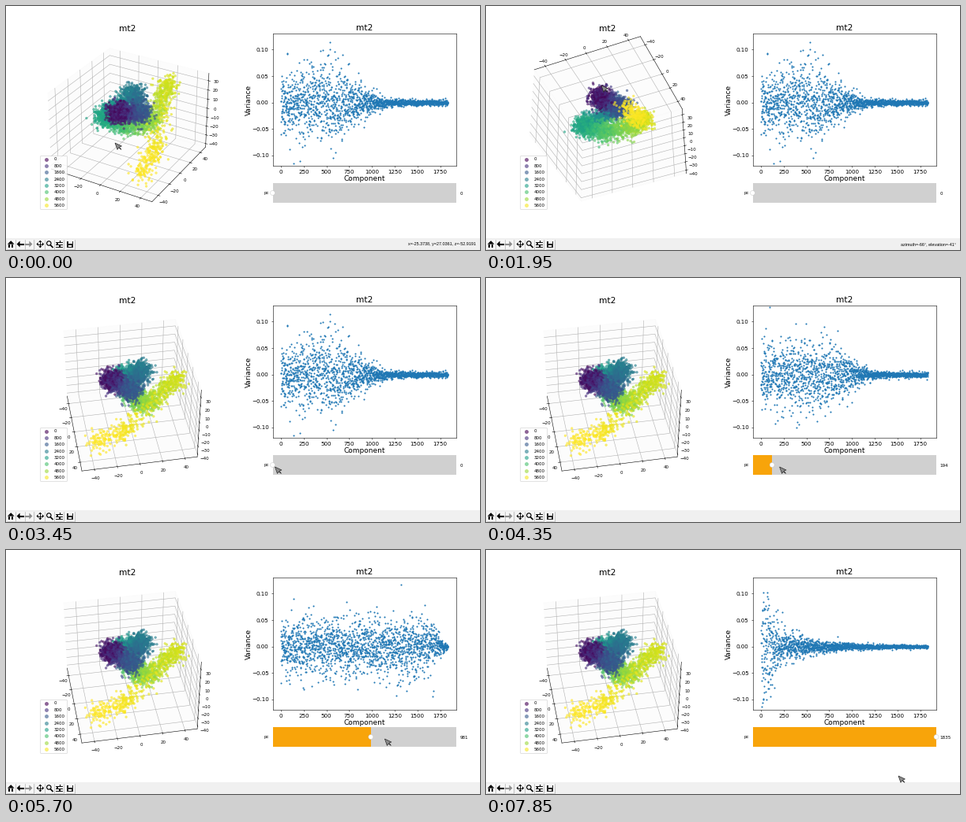
These frames come from a looping animation (600x310 px, 7.9 s). A matplotlib script:

```python
import matplotlib.pyplot as plt
import numpy as np
from matplotlib.animation import FuncAnimation
from matplotlib.patches import Circle, Polygon, Rectangle

W, H = 600, 310
FRAMES, STEP = 158, 50
N_COMP, N_POINTS, LAST = 1835, 4000, 5800
TRACK_X, TRACK_Y, TRACK_W, TRACK_H = 337.5, 224.8, 232.5, 25.4
KNOB_Y = TRACK_Y + TRACK_H / 2

fig = plt.figure(figsize=(12, 6.2), dpi=50, facecolor="white")


def add_axes(x, y, w, h, **kw):
    """Axes placed in pixels from the top left corner."""
    return fig.add_axes([x / W, 1 - (y + h) / H, w / W, h / H], **kw)


def ramp(t, start, end):
    return np.clip((t - start) / (end - start), 0, 1)


def smooth(u):
    return u * u * (3 - 2 * u)


# Visited states: time index and centre of each cluster
STATES = np.array([
    (0, -2, -17, 14), (700, -2, -16, 14), (1550, 12, -1, 10),
    (2350, -3, 11, 22), (3350, -25, -4, -4), (4150, -6, 3, -11),
    (4750, 15, 11, -5), (5300, 18, 38, 24), (5560, 31, -10, -20),
    (LAST, 30, -38, -30),
])


def trajectory():
    """Noisy walk that lingers at every state."""
    rng = np.random.default_rng(4)
    idx = np.linspace(0, LAST, N_POINTS)
    place = np.interp(idx, STATES[:, 0], range(len(STATES)))
    place = np.floor(place) + smooth(place % 1)
    centre = [np.interp(place, range(len(STATES)), c) for c in STATES.T[1:]]
    return idx, np.clip(centre + rng.normal(0, 4.4, (3, N_POINTS)), -49, 49)


# 3D scatter
ax3 = add_axes(40.2, 36, 227, 227, projection="3d")
idx, points = trajectory()
cloud = ax3.scatter(*points, c=idx, cmap="viridis", vmin=0, vmax=5650,
                    s=15, linewidths=0.8, alpha=0.6)
ax3.set(xlim=(-51, 51), ylim=(-51, 51), zlim=(-44, 38))
ax3.set_xticks(range(-40, 41, 20))
ax3.set_yticks(range(-40, 41, 20))
ax3.set_zticks(range(-40, 31, 10))
ax3.tick_params(labelsize=8, pad=0.5)
for axis in (ax3.xaxis, ax3.yaxis, ax3.zaxis):
    axis.set_pane_color((0.98, 0.98, 0.98, 0.5))
# Axes3D scales the title height by 0.92
ax3.set_title("mt2", fontsize=15.3, y=1 / 0.92)
handles, labels = cloud.legend_elements(num=list(range(0, 5601, 800)),
                                        fmt="{x:.0f}", markersize=3.6)
ax3.legend(handles, labels, loc="lower left", fontsize=8, labelspacing=0.61,
           bbox_to_anchor=(0, 0.008))

# Loadings of one component
ax2 = add_axes(TRACK_X, 35.4, TRACK_W, 167.6)
comp = np.arange(N_COMP)
dots, = ax2.plot(comp, 0 * comp, "o", ms=3, mew=0, color="#1f77b4")
ax2.set(xlim=(-91, 1928), ylim=(-0.1194, 0.1298))
ax2.set_xticks(range(0, 1751, 250))
ax2.set_yticks(np.arange(-2, 3) * 0.05)
ax2.tick_params(labelsize=10.3)
ax2.set_title("mt2", fontsize=15.3, y=1)


def loadings(pc):
    """Noise with a plateau that widens with pc; the last ones decay early."""
    knee, width = 800 + 0.95 * pc, 130 * np.exp(-pc / 480)
    level = 0.024 + 0.015 * np.exp(-pc / 250)
    drop = np.exp(np.minimum((comp - knee) / width, 50))
    dip = 1 - 0.4 * np.exp(-pc / 200 - comp / 150)
    plateau = 0.0025 + level * dip / (1 + drop)
    decay = (0.06 * np.exp(-comp / 90) + 0.024 * np.exp(-comp / 430) + 0.001)
    late = (pc / N_COMP) ** 40
    spread = plateau + late * (decay - plateau)
    return np.random.default_rng(pc).standard_t(12, N_COMP) * 0.91 * spread


# Pixel overlay for slider, toolbar and pointer
ov = add_axes(0, 0, W, H, zorder=5)
ov.set(xlim=(0, W), ylim=(H, 0))
ov.axis("off")


def rect(x, y, w, h, color, **kw):
    return ov.add_patch(Rectangle((x, y), w, h, fc=color, **{"lw": 0, **kw}))


def triangle(x, y, dx, dy, size, color="black"):
    """Triangle with its tip at x, y, pointing along dx, dy."""
    bx, by = x - size * dx, y - size * dy
    ov.add_patch(Polygon([(x, y), (bx + size * dy, by + size * dx),
                          (bx - size * dy, by - size * dx)], fc=color, lw=0))


def line(x0, y0, x1, y1, color="black", lw=1.3):
    ov.plot([x0, x1], [y0, y1], color=color, lw=lw, scalex=False, scaley=False)


def circle(x, y, r, **kw):
    return ov.add_patch(Circle((x, y), r, **kw))


def label(x, y, s, size, **kw):
    return ov.text(x, y, s, fontsize=size,
                   **{"ha": "center", "va": "center", **kw})


def toolbar(y=302.5):
    rect(0, 295, W, 15, "#f0f0f0")
    for x in (0.5, 12, 23.5, 37.5, 49, 61, 75.5):
        rect(x, 296.5, 11.5, 12, "#f6f6f6")
        line(x + 11.5, 297, x + 11.5, 308.5, "#a8a8a8", 0.9)
        line(x, 308.5, x + 11.5, 308.5, "#c0c0c0", 0.9)
    # home
    triangle(6.2, y - 4.3, 0, -1, 4.4)
    rect(3.2, y, 2.2, 4, "black")
    rect(7, y, 2.2, 4, "black")
    # back and forward
    for x, dx, color in ((17.8, -1, "black"), (29.2, 1, "#8c8c8c")):
        triangle(x + 4.2 * dx, y, dx, 0, 4, color)
        line(x, y, x - 4 * dx, y, color, 3)
    # pan
    for dx, dy in ((1, 0), (-1, 0), (0, 1), (0, -1)):
        triangle(43.3 + 4.8 * dx, y + 4.8 * dy, dx, dy, 2.2)
        line(43.3, y, 43.3 + 3 * dx, y + 3 * dy)
    # zoom
    circle(54.3, y - 1, 2.7, fc="none", ec="black", lw=1.7)
    line(56.3, y + 1.2, 59, y + 4, lw=2.4)
    # subplots
    for dy, dx in ((-3, 1.5), (0, -2), (3, 1)):
        line(63.2, y + dy, 70.8, y + dy)
        rect(66.3 + dx, y + dy - 1.2, 1.6, 2.4, "black")
    # save
    rect(77.3, y - 4, 8, 8, "#222222")
    rect(79, y - 3.3, 4.6, 2.8, "#f5f5f5")
    rect(79.2, y + 1, 4.2, 2.4, "#f5f5f5")


toolbar()
label(453.7, 219.3, "Component", 13)
label(307, 119.5, "Variance", 13, rotation=90)
rect(TRACK_X, TRACK_Y, TRACK_W, TRACK_H, "#d0d0d0")
fill = rect(TRACK_X, TRACK_Y, 0, TRACK_H, "#f8a40a")
knob = circle(TRACK_X, KNOB_Y, 3, fc="white", ec="#c0c0c0", lw=0.6)
label(333, 238, "pc", 8.2, ha="right")
value = label(574.8, 238, "0", 8.2, ha="left")
status = label(595, 302.5, "", 7.7, ha="right", family="Liberation Sans")

ARROW = np.array([(0, 0), (8.5, 4), (5.5, 5), (8, 8.5), (4.5, 6), (3, 8.5)])
pointer = ov.add_patch(Polygon(ARROW, fc="#8a8a8a", ec="#202020", lw=0.9,
                               zorder=6))


def view(t):
    first = ramp(t, 100, 800)
    azim = -60 - 25 * first + 75 * ramp(t, 800, 2850) ** 2.4
    elev = (30 + 41 * first - 112 * smooth(ramp(t, 1000, 1950))
            + 81 * smooth(ramp(t, 1950, 2850)))
    return azim, elev


def pointer_tip(t, azim, elev, done):
    """Drags the view, then the slider, then rests on the toolbar."""
    if t >= 7850:
        return np.array([522, 287])
    drag = np.array([138 - 1.26 * (azim + 60), 174 + 1.03 * (elev - 30)])
    slide = np.array([TRACK_X + 3 + TRACK_W * done + 20 * done ** 0.5, 240])
    rest = np.array([536, 300])
    tip = drag + (slide - drag) * smooth(ramp(t, 2950, 3350))
    return tip + (rest - tip) * smooth(ramp(t, 6900, 7450))


def update(frame):
    t = frame * STEP
    azim, elev = view(t)
    ax3.view_init(elev=elev, azim=azim)

    pc = int(round(N_COMP * ramp(t, 3550, 6700) ** 1.64))
    done = pc / N_COMP
    dots.set_ydata(loadings(pc))
    fill.set_width(TRACK_W * done)
    knob.center = (TRACK_X + TRACK_W * done, KNOB_Y)
    value.set_text(str(pc))
    pointer.set_xy(ARROW + pointer_tip(t, azim, elev, done))

    if t < 100:
        status.set_text("x=-25.3738, y=27.0361, z=-52.9191")
    elif t < 3000:
        status.set_text(f"azimuth={azim:.0f}°, elevation={elev:.0f}°")
    else:
        status.set_text("")
    return []


anim = FuncAnimation(fig, update, frames=FRAMES, interval=STEP, repeat=True)
plt.show()
```
